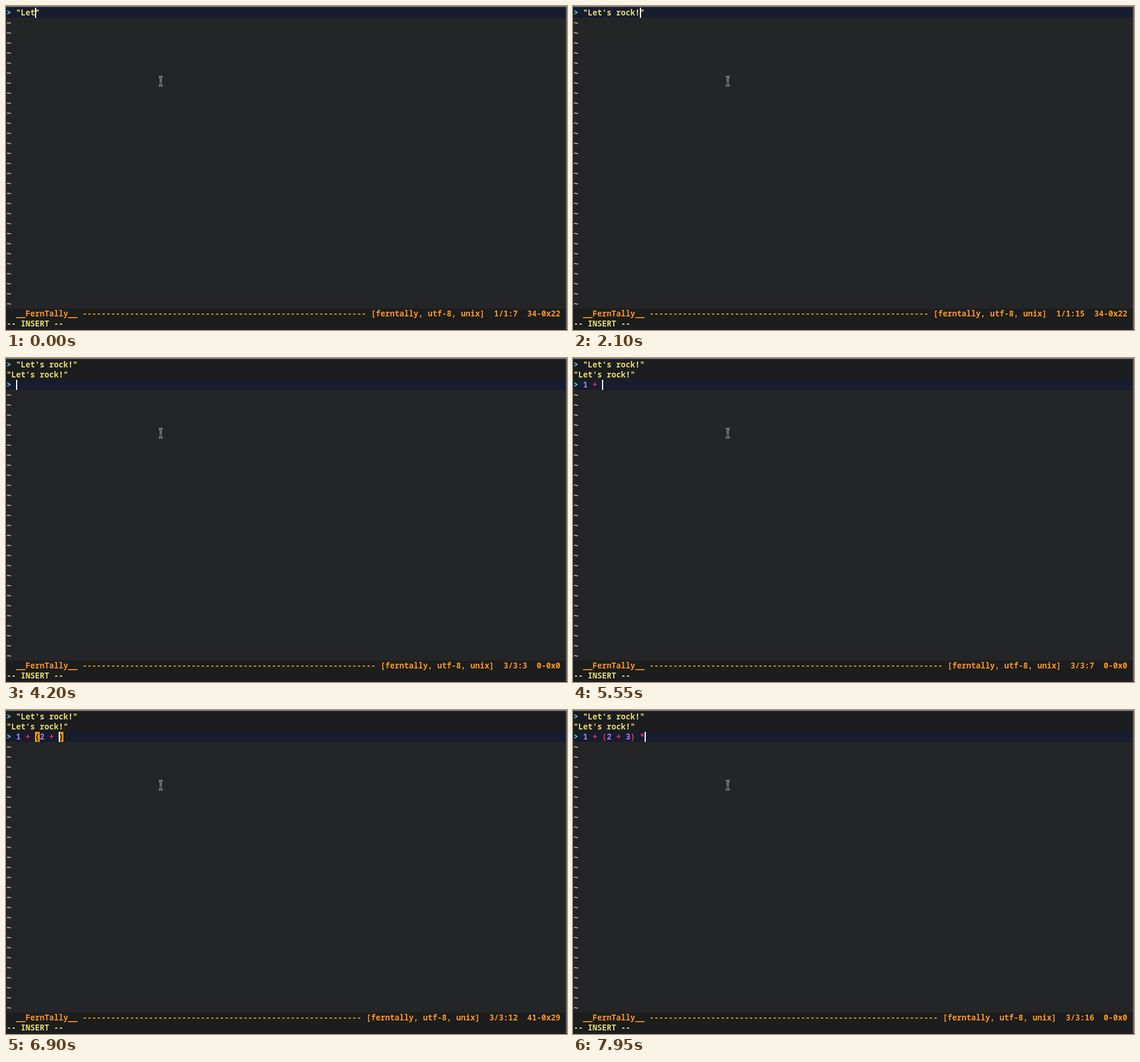
Recreate the animation shown at these times as an HTML page with a canvas. Size 948 by 549 pixels, loop 8 s.

```html
<!DOCTYPE html>
<html lang="en">
<head>
<meta charset="utf-8">
<title>Calculator session</title>
<style>
  html, body { margin: 0; width: 100%; height: 100%; overflow: hidden; background: #232526; }
  canvas { display: block; width: 948px; height: 549px; }
</style>
</head>
<body>
<canvas id="stage" width="948" height="549"></canvas>
<script>
const ctx = document.getElementById("stage").getContext("2d");

const LOOP = 8000, CELL = 8, ROW = 17, LEFT = 1, TOP = 3, COLS = 117;
const STATUS_ROW = 30;
const TEXT = '600 13.333px "Noto Sans Mono", "DejaVu Sans Mono", monospace';
const WIDE = 'bold 13.333px "DejaVu Sans Mono", monospace';
const C = {
  empty: "#232526", text: "#1b1d1e", line: "#171d2e",
  yellow: "#e6db74", cyan: "#66d9ef", purple: "#ae81ff", pink: "#f92672",
  red: "#e8403f", orange: "#fd971f", tilde: "#bcbcbc", white: "#ffffff"
};

const ENTER = 2550;
const GREETING = "Let's rock!";
const greetTimes = [450, 600, 750, 1200, 1350, 1500, 1650, 2100];
const sum = "1 + (2 + 3) *";
const sumTimes = [4800, 4950, 5250, 5550, 6000, 6300, 6450, 6750, 6900, 7200, 7500, 7650, 7950];
const blinkOff = [[3300, 3450], [3900, 4200]];

const countPast = (times, t) => times.filter(k => k <= t).length;
const colX = col => LEFT + col * CELL;
const rowY = row => TOP + row * ROW;

function box(x, y, w, h, color) {
  ctx.fillStyle = color;
  ctx.fillRect(x, y, w, h);
}

function write(text, col, row, color, font = TEXT) {
  ctx.font = font;
  ctx.fillStyle = color;
  ctx.fillText(text, colX(col), rowY(row) + 13);
}

// Lines of the buffer and the cursor column at time t
function session(t) {
  if (t < ENTER) {
    const typed = GREETING.slice(0, 3 + countPast(greetTimes, t));
    return { lines: [`> "${typed}"`], col: 3 + typed.length };
  }
  const typed = sum.slice(0, countPast(sumTimes, t));
  const open = typed.includes("(") && !typed.includes(")");
  return {
    lines: [`> "${GREETING}"`, `"${GREETING}"`, "> " + typed + (open ? ")" : "")],
    col: 2 + typed.length
  };
}

function charColor(ch) {
  if (/\d/.test(ch)) return C.purple;
  if (/[()]/.test(ch)) return C.red;
  return C.pink;
}

function drawLine(line, row) {
  let start = 0;
  if (line[0] === ">") {
    write(">", 0, row, C.cyan);
    start = 2;
  }
  const body = line.slice(start);
  if (body[0] === '"') {
    write(body, start, row, C.yellow);
    return;
  }
  [...body].forEach((ch, i) => write(ch, start + i, row, charColor(ch)));
}

function drawMatch(line, col, row) {
  const close = [col, col - 1].find(i => line[i] === ")");
  if (close === undefined) return;
  for (const i of [line.indexOf("("), close]) {
    box(colX(i), rowY(row), CELL, ROW, C.orange);
    write(line[i], i, row, "#000");
  }
}

function drawStatus(lines, col) {
  const n = lines.length;
  const under = lines[n - 1].charCodeAt(col) || 0;
  const right = `[ferntally, utf-8, unix]  ${n}/${n}:${col + 1}  ${under}-0x${under.toString(16)}`;
  const left = "  __FernTally__ ";
  const dashes = "-".repeat(COLS - left.length - right.length - 1);
  box(0, rowY(STATUS_ROW), 946, 2 * ROW, C.text);
  write(left + dashes + " " + right, 0, STATUS_ROW, C.orange);
  write("-- INSERT --", 0, STATUS_ROW + 1, C.yellow);
}

function drawPointer() {
  const beam = new Path2D(
    "M258.5 120 Q261.5 120 261.5 122.5 V132.5 Q261.5 135 258.5 135 " +
    "M264.5 120 Q261.5 120 261.5 122.5 M261.5 132.5 Q261.5 135 264.5 135 M260 130.5 H263");
  for (const [width, color] of [[2.8, "#dcdcdc"], [1.2, "#111"]]) {
    ctx.lineWidth = width;
    ctx.strokeStyle = color;
    ctx.stroke(beam);
  }
}

function drawFrame() {
  box(0, 0, 948, 1, "#8e8e8e");
  box(0, 1, 948, 1, "#4a4c4d");
  box(946, 1, 2, 548, "#626464");
  box(0, 548, 948, 1, "#111314");
}

function draw(t) {
  const { lines, col } = session(t);
  const row = lines.length - 1;
  box(0, 0, 948, 549, C.empty);
  box(0, 0, 946, rowY(row), C.text);
  const top = row ? rowY(row) : 2;
  box(0, top, 946, rowY(row + 1) - top, C.line);
  lines.forEach(drawLine);
  drawMatch(lines[row], col, row);
  for (let r = row + 1; r < STATUS_ROW; r++) write("~", 0, r, C.tilde, WIDE);
  drawStatus(lines, col);
  if (!blinkOff.some(([a, b]) => t >= a && t < b)) box(colX(col), rowY(row), 2, ROW, C.white);
  drawPointer();
  drawFrame();
}

const began = performance.now();
function tick() {
  draw((performance.now() - began) % LOOP);
  requestAnimationFrame(tick);
}
tick();
</script>
</body>
</html>
```
